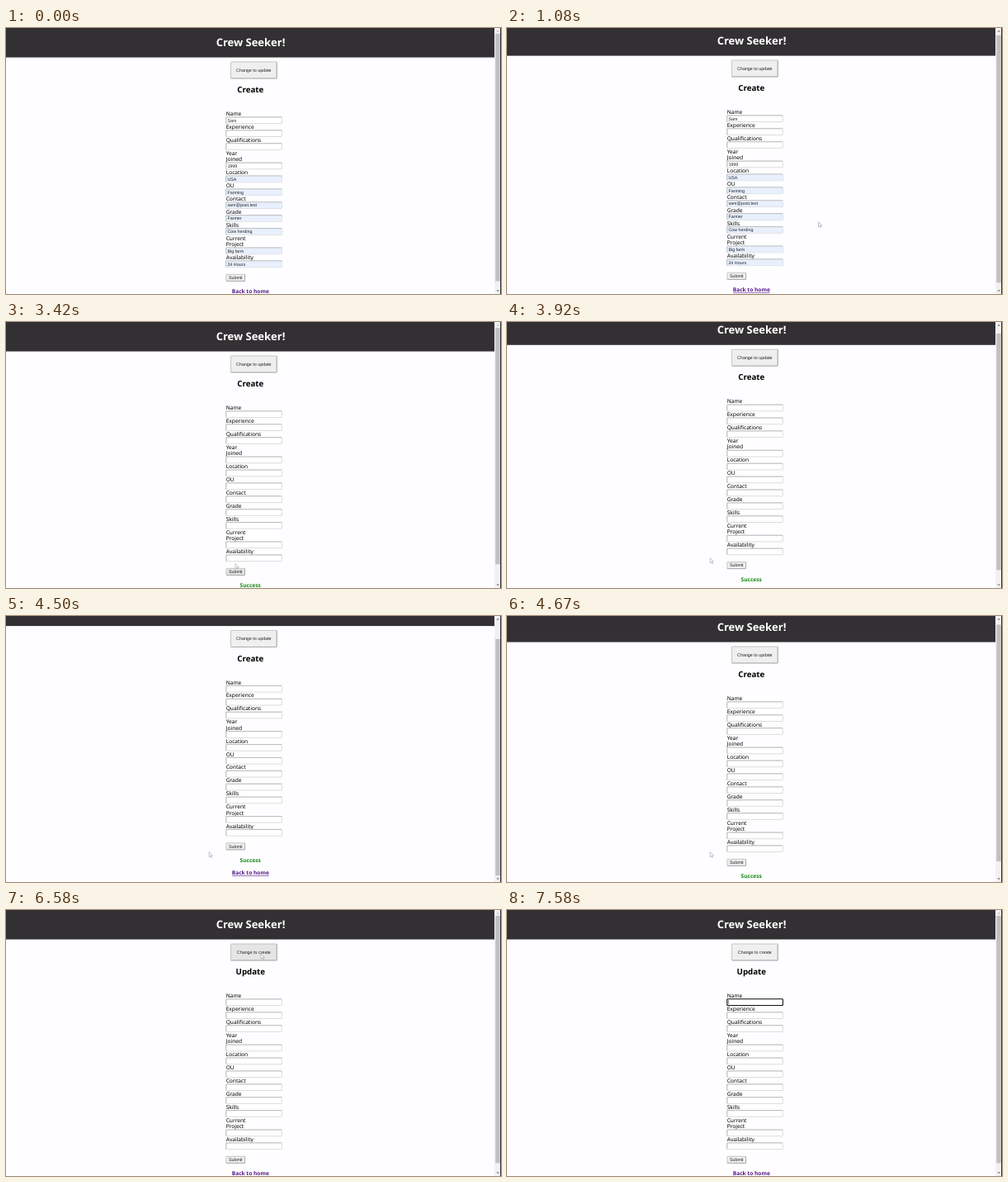
These frames come from a looping animation (600 by 322 pixels, 8 s). An HTML page:

```html
<!DOCTYPE html>
<html lang="en">
<head>
<meta charset="utf-8">
<title>Form</title>
<style>
html, body { margin: 0; width: 100%; height: 100%; overflow: hidden; background: #fefdff; }
svg { display: block; width: 600px; height: 322px; text-rendering: geometricPrecision; }
text { font: 6.6px "Noto Sans", "Open Sans", sans-serif; fill: #000; }
text.ui { font: 5.35px "Liberation Sans", Arial, sans-serif; fill: #222; }
text.bold { font-weight: 700; }
text.mid { text-anchor: middle; }
</style>
</head>
<body>
<svg id="stage" viewBox="0 0 600 322"></svg>
<script>
const LOOP = 8000, FPS = 12, VIEW = 322;
const stage = document.getElementById('stage');

function add(parent, tag, attrs, text) {
  const el = document.createElementNS('http://www.w3.org/2000/svg', tag);
  for (const key in attrs) el.setAttribute(key, attrs[key]);
  if (text) el.textContent = text;
  parent.appendChild(el);
  return el;
}
const box = (parent, x, y, width, height, fill, more) =>
  add(parent, 'rect', { x, y, width, height, fill, ...more });
const label = (parent, x, y, cls, text, style = '') =>
  add(parent, 'text', { x, y, class: cls, style }, text);
const show = (el, on) => el.setAttribute('visibility', on ? 'visible' : 'hidden');

function button(x, y, w, h, text) {
  const face = box(page, x, y, w, h, '#efefef', { stroke: '#b4b4b4', 'stroke-width': 0.7, rx: 0.6 });
  add(page, 'path', { d: `M${x} ${y + h}h${w}v${-h}`, fill: 'none', stroke: '#999', 'stroke-width': 0.6 });
  return { face, text: label(page, x + w / 2, y + h / 2 + 1.9, 'ui mid', text) };
}

box(stage, 0, 0, 600, VIEW, '#fefdff');
const page = add(stage, 'g', {});
box(page, 0, 0, 592.2, 35.6, '#333033');
label(page, 296.5, 22.1, 'bold mid', 'Crew Seeker!', 'font-size:13px;fill:#fff');
const toggle = button(272.5, 41, 55.7, 20, '');
const heading = label(page, 296.3, 78.1, 'bold mid', '', 'font-size:9.7px;fill:#000');

// label, value, browser-filled
const rows = [
  ['Name', 'Sam'], ['Experience', ''], ['Qualifications', ''],
  ['Year'], ['Joined', '1999'], ['Location', 'USA', 1], ['OU', 'Farming', 1],
  ['Contact', 'sam@post.test', 1], ['Grade', 'Farmer', 1], ['Skills', 'Cow herding', 1],
  ['Current'], ['Project', 'Big farm', 1], ['Availability', '24 Hours', 1]
];
const values = [];
let rowY = 103.7;
for (const [name, value, filled] of rows) {
  label(page, 266.7, rowY + 2.3, '', name);
  if (value === undefined) { rowY += 7.5; continue; }
  const y = rowY + 4.2;
  box(page, 266.8, y, 67.5, 7.7, '#fff', { stroke: '#c6c6c6', 'stroke-width': 0.6, rx: 0.5 });
  const content = add(page, 'g', {});
  if (filled) box(content, 267.1, y + 0.3, 66.9, 7.1, '#e8f0fe');
  label(content, 268.4, y + 5.6, 'ui', value);
  values.push(content);
  add(page, 'path', { d: `M266.8 ${y + 7.7}v-7.7h67.5`, fill: 'none', stroke: '#a4a4a4', 'stroke-width': 0.6 });
  rowY += 15.9;
}

const focus = add(page, 'g', {});
box(focus, 266.8, 107.8, 67.6, 7.7, '#fff', { stroke: '#111', 'stroke-width': 1.1, rx: 0.8 });
box(focus, 268.3, 109.2, 0.5, 5, '#222');

const submit = button(266.9, 298.3, 22.6, 8.1, 'Submit');
const success = label(page, 296.2, 321.4, 'bold mid', 'Success', 'fill:#148a14');
const home = add(page, 'g', {});
label(home, 296.3, 321.4, 'bold mid', 'Back to home', 'fill:#551a8b');
box(home, 274.2, 322.1, 44.4, 0.6, '#551a8b');

box(stage, 592.2, 0, 6.8, VIEW, '#f1f1f1');
const thumb = box(stage, 593.2, 7, 5.5, 290, '#c1c1c1');
const upArrow = add(stage, 'path', { d: 'M594.6 4.6l1.5-1.7 1.5 1.7z' });
const downArrow = add(stage, 'path', { d: 'M594.6 317.4l1.5 1.7 1.5-1.7z' });
box(stage, 599, 0, 1, VIEW, '#333');

const pointer = add(stage, 'path', {
  d: 'M0 0v6l1.4-1.2 1 2.1 1-.5-1-2h1.8z',
  fill: '#fff', stroke: '#8a8a8a', 'stroke-width': 0.5
});

// keys: [step, value...] with 12 steps per second
const scrollKeys = [
  [0, 0], [12, 0], [13, 2], [14, 9.2], [40, 9.2], [41, 0], [46, 0],
  [47, 7.8], [48, 24.2], [53, 24.2], [54, 23.5], [55, 13], [56, 4], [57, 0], [96, 0]
];
const pointerKeys = [
  [0, 481, 225], [7, 481, 225], [12, 377.5, 234.7], [26, 377.5, 234.7],
  [32, 258.7, 292.4], [36, 278, 292.5], [42, 278, 292.5], [46, 246.2, 285.6],
  [61, 246.2, 285.6], [68, 328.2, 67.6], [71, 309, 53], [81, 309, 53],
  [88, 303, 109], [96, 303, 109]
];

function sample(keys, k, ease) {
  let i = 1;
  while (i < keys.length - 1 && keys[i][0] <= k) i++;
  const a = keys[i - 1], b = keys[i];
  const p = ease((k - a[0]) / (b[0] - a[0]));
  return a.slice(1).map((v, j) => v + (b[j + 1] - v) * p);
}
const linear = p => p;
const smooth = p => p * p * (3 - 2 * p);

function draw(time) {
  const k = Math.floor((time % LOOP + 5) * FPS / 1000);
  const sent = k >= 41, updating = k >= 75, saved = sent && !updating;
  const [scroll] = sample(scrollKeys, k, linear);
  const [x, y] = sample(pointerKeys, k, smooth);
  const height = saved ? 346.4 : 331.2, track = 308;

  page.setAttribute('transform', `translate(0 ${-scroll})`);
  values.forEach(v => show(v, !sent));
  show(success, saved);
  home.setAttribute('transform', `translate(0 ${saved ? 15.6 : 0})`);
  heading.textContent = updating ? 'Update' : 'Create';
  toggle.text.textContent = updating ? 'Change to create' : 'Change to update';
  toggle.face.setAttribute('fill', k >= 70 && k < 83 ? '#e5e5e5' : '#efefef');
  submit.face.setAttribute('fill', k >= 34 && k < 44 ? '#e5e5e5' : '#efefef');
  show(focus, k >= 89);

  thumb.setAttribute('y', 7 + scroll / height * track);
  thumb.setAttribute('height', VIEW / height * track);
  upArrow.setAttribute('fill', scroll > 0 ? '#444' : '#a8a8a8');
  downArrow.setAttribute('fill', scroll < height - VIEW - 0.3 ? '#444' : '#a8a8a8');

  show(pointer, k >= 5 && k < 88);
  pointer.setAttribute('transform', `translate(${x} ${y})`);
}

const start = performance.now();
function tick() {
  draw(performance.now() - start);
  requestAnimationFrame(tick);
}
tick();
</script>
</body>
</html>
```
